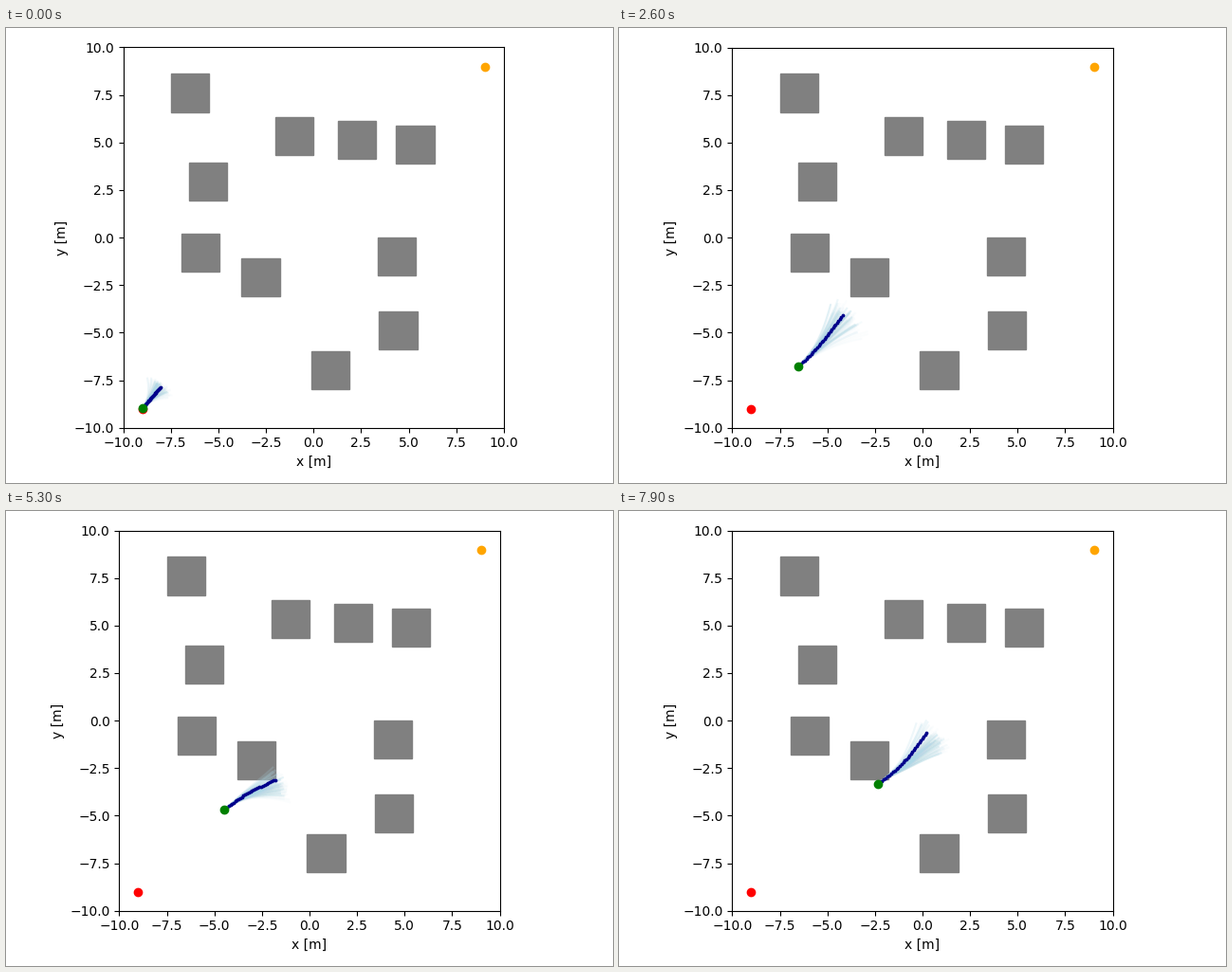
These frames come from a looping animation (640 px wide and 480 px high, 8 s). A matplotlib script:

```python
import numpy as np
import matplotlib.pyplot as plt
from matplotlib.animation import FuncAnimation
from matplotlib.collections import LineCollection
from matplotlib.colors import to_rgb
from matplotlib.patches import Rectangle

FRAMES, STEP_MS = 80, 100
HORIZON, SAMPLES, STRAYS = 31, 100, 5
S = np.linspace(0, 1, HORIZON)

OBSTACLES = [(-6.49, 7.61), (-0.99, 5.34), (2.30, 5.16), (5.35, 4.89),
             (-5.53, 2.95), (-5.93, -0.81), (-2.78, -2.09), (4.39, -1.0),
             (4.45, -4.88), (0.87, -6.98)]

# waypoints of the robot and the steps at which it passes them
STEPS = np.array([0, 16, 26, 36, 53, 65, 79])
WAY = np.array([(-8.98, -8.96), (-7.53, -7.64), (-6.53, -6.79), (-5.77, -5.89),
                (-4.49, -4.69), (-3.44, -3.97), (-2.34, -3.32)])
SPEED = np.gradient(WAY, STEPS, axis=0)


def robot_at(i):
    """Cubic Hermite curve through the waypoints."""
    k = min(np.searchsorted(STEPS, i, side="right") - 1, len(STEPS) - 2)
    h = STEPS[k + 1] - STEPS[k]
    u = (i - STEPS[k]) / h
    ease = u * u * (3 - 2 * u)
    return (WAY[k] + ease * (WAY[k + 1] - WAY[k])
            + h * u * (1 - u) * ((1 - u) * SPEED[k] - u * SPEED[k + 1]))


def wave(i, peak, period):
    return np.cos(2 * np.pi * (i - peak) / period)


def plan_at(i):
    """Planned path relative to the robot: it weaves and bends as it goes."""
    bearing = 49 - 0.17 * i + 11 * wave(i, 34, 45)
    sway = wave(i, 76, 60)
    reach = (3.4 + 0.35 * sway) * (1 - 0.57 * np.exp(-i / 4))
    turn = np.tanh(5 * (S[1:] - 0.45))
    heading = np.radians(bearing + 9 * sway * (turn - turn.mean()))
    moves = np.column_stack([np.cos(heading), np.sin(heading)])
    path = np.vstack([[0, 0], np.cumsum(moves, axis=0)])
    return path * reach / (HORIZON - 1)


def bend(path, degrees, scale):
    """Turn a path progressively and scale it."""
    a = np.radians(degrees) * S**0.7
    x, y = path.T * scale
    return np.column_stack([x * np.cos(a) - y * np.sin(a),
                            x * np.sin(a) + y * np.cos(a)])


def fan_at(i, plan):
    """Sampled paths around the plan, drifting to its right over time."""
    rng = np.random.default_rng(100 + i)
    drift = -10 * i / FRAMES
    spread = 7 + 7 * np.exp(-i / 4)
    angles = np.append(rng.normal(drift, spread, SAMPLES), rng.normal(8, 2, STRAYS))
    scales = rng.normal(1.03, 0.06, SAMPLES + STRAYS)
    return [bend(plan, a, s) for a, s in zip(angles, scales)]


fig, ax = plt.subplots(figsize=(6.4, 4.8), dpi=100)
ax.set(xlim=(-10, 10), ylim=(-10, 10), xlabel="x [m]", ylabel="y [m]")
ax.set_aspect("equal")
for x, y in OBSTACLES:
    ax.add_patch(Rectangle((x - 1, y - 1), 2, 2, color="gray", zorder=0))
ax.scatter(-9, -9, color="red", zorder=10)
ax.scatter(9, 9, color="orange", zorder=10)
robot = ax.scatter(-9, -9, color="green", zorder=100)
plan_dots = ax.scatter(S, S, s=3, color="darkblue", zorder=2)

alphas = np.append(0.04 + 0.35 * np.exp(-np.arange(SAMPLES) / 10),
                   np.full(STRAYS, 0.2))
fan_lines = LineCollection([], colors=[(*to_rgb("lightblue"), a) for a in alphas],
                           linewidths=1.5, capstyle="projecting", zorder=1)
ax.add_collection(fan_lines, autolim=False)


def fit_layout(i):
    # the equal aspect needs a second pass to settle; the first step shows one
    fig.subplots_adjust(left=0.125, right=0.9, bottom=0.11, top=0.88)
    for _ in range(2 if i else 1):
        fig.tight_layout()


def update(i):
    pos, plan = robot_at(i), plan_at(i)
    robot.set_offsets([pos])
    plan_dots.set_offsets(pos + plan)
    fan_lines.set_segments([pos + path for path in fan_at(i, plan)])
    fit_layout(i)
    return robot, plan_dots, fan_lines


anim = FuncAnimation(fig, update, frames=FRAMES, interval=STEP_MS,
                     repeat=True, repeat_delay=0, blit=False)
plt.show()
```
